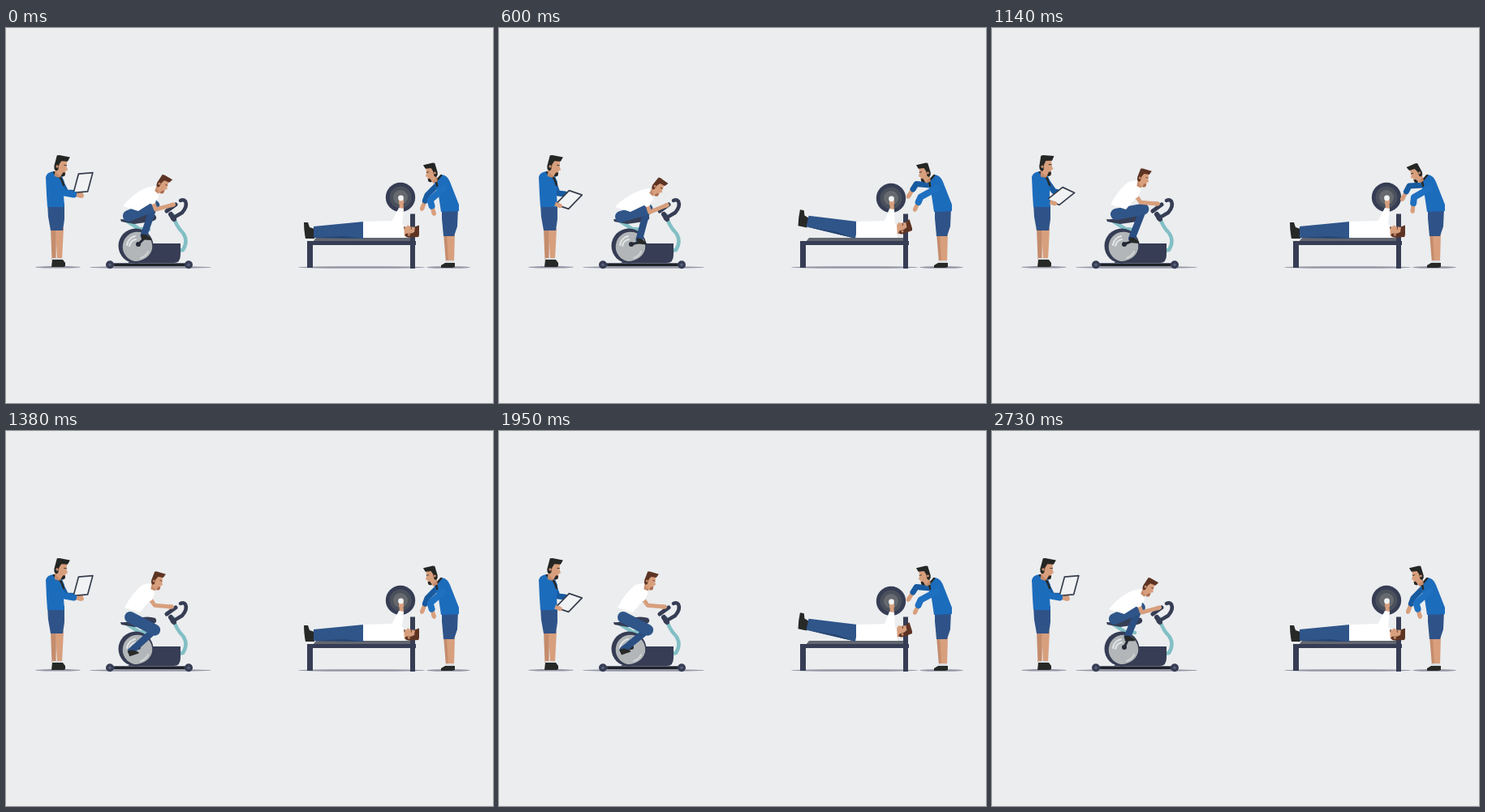
Animation, 600 px wide and 463 px high, one loop 2.76 s. Source, as an HTML page:

```html
<!DOCTYPE html>
<html lang="en">
<head>
<meta charset="utf-8">
<title>Gym training</title>
<style>
html, body { margin: 0; width: 100%; height: 100%; overflow: hidden; background: #ebedef; }
svg { display: block; width: 100%; height: 100%; }
.line { fill: none; stroke-linecap: round; stroke-linejoin: round; }
.navy { fill: #363d54; }
.skin { fill: #d89f7d; }
.shade { fill: #c48c6c; }
.black { fill: #272927; }
.jacket { fill: #1c6cbc; }
.shorts { fill: #2f5388; }
.floor { fill: #9495a5; }
.sock { fill: #d9dcdf; }
.white { fill: #fff; }
</style>
</head>
<body>
<svg viewBox="0 0 600 463" preserveAspectRatio="none">
  <g class="floor">
    <ellipse cx="64" cy="295.3" rx="28" ry="1.3"/>
    <ellipse cx="178" cy="295.5" rx="75" ry="1.3"/>
    <ellipse cx="438" cy="295.5" rx="78" ry="1.3"/>
    <ellipse cx="545" cy="295.5" rx="27" ry="1.3"/>
  </g>

  <g id="coach">
    <path class="shade" d="M55 247h7l-.5 39h-5z"/>
    <path class="skin" d="M61 247h10l-2 39h-6z"/>
    <path class="sock" d="M57 284h12v3H57z"/>
    <path class="black" d="M57 286h13l3 4v4l-2 1H56z"/>
    <path class="shorts" d="M51 216h21v20l-2 14H55l-3-17z"/>
    <g id="coachFar"></g>
    <path class="jacket" d="M49 184q1-6 10-7l9 4 4 9-1 16 1 15H51l-1-15z"/>
    <path class="line" stroke="#272927" stroke-width="2.5" d="M59 178L68 186L71 194"/>
    <g id="coachHead"></g>
    <path id="tablet" fill="#f1f2f4" stroke="#363d4c" stroke-width="1.7" stroke-linejoin="round"/>
    <g id="coachNear"></g>
  </g>

  <g id="bike">
    <path class="line" stroke="#82bfc5" stroke-width="4.5" d="M206 231Q209 244 218 253Q225 263 218 274L213 275M150 239L164 248L176 249"/>
    <circle class="navy" cx="160" cy="269" r="21.5"/>
    <circle cx="162" cy="270" r="18.3" fill="#b2b6b8"/>
    <path class="line" stroke="#e3e6e7" stroke-width="2" d="M149 268a13 13 0 0 1 10-11M152 269a10 10 0 0 1 8-8"/>
    <path class="line" stroke="#d0d3d4" stroke-width="2" d="M175 276a14 14 0 0 1-9 8"/>
    <path class="navy" d="M150 289C172 289 181 280 181 266H215V280Q215 290 207 290H152z"/>
    <path class="line" stroke="#363d54" stroke-width="4" d="M128 292.3H225"/>
    <path class="line" stroke="#1f2228" stroke-width="3" d="M135 292.5H219"/>
    <g class="navy"><circle cx="128" cy="292.3" r="5"/><circle cx="225" cy="292.3" r="5"/></g>
    <g fill="#596179"><circle cx="128" cy="292.3" r="1.8"/><circle cx="225" cy="292.3" r="1.8"/></g>
    <path class="navy" d="M141 236Q153 237 162 231Q175 228 184 231Q188 237 179 239L158 242L142 239z"/>
    <path class="line" stroke="#363d54" stroke-width="4.5" d="M205 235L217 228Q224 220 221 214Q219 211 215 213"/>
    <path class="line" stroke="#363d54" stroke-width="6" d="M203 230L207 236"/>
    <path class="line" stroke="#363d54" stroke-width="5" d="M198 226L209 218"/>
    <path id="crank" class="line" stroke="#252a36" stroke-width="3"/>
    <circle cx="163" cy="267" r="3" fill="#252a36"/>
  </g>

  <g id="rider">
    <path id="shank" class="line" stroke="#2b4f83" stroke-width="8.5"/>
    <path id="thigh" class="line" stroke="#2f5589" stroke-width="14"/>
    <path id="shoe" class="black" d="M-4-5L2-4L8 1V3L-4 2z"/>
    <path id="shirt" class="white"/>
    <g id="riderHead"></g>
    <g id="riderArm"></g>
  </g>

  <g id="bench">
    <path fill="#62666f" d="M382 259H498V264H378z"/>
    <path class="navy" d="M371 263H505V268H378V296H371zM498 229.5H504V297H498z"/>
  </g>
  <g id="lifter">
    <g id="legs">
      <path class="black" d="M367 240h5l2 6 6 2v12h-11q-2-10-2-20z"/>
      <path fill="#2f5589" d="M379 245L441 239V260L379 259z"/>
      <path fill="#27446f" d="M379 259L416 257L441 260z"/>
    </g>
    <g id="lifterHead"></g>
    <path class="white" d="M440 239L476 238L490 243L491 259H440z"/>
    <g id="bar">
      <circle class="navy" cx="486" cy="209" r="18.2"/>
      <circle cx="486" cy="209" r="13.5" fill="#4b515c"/>
      <circle cx="486" cy="209" r="9" fill="#666a6f"/>
      <path class="line" stroke="#d89f7d" stroke-width="5" d="M487 217L487.500 225"/>
      <path class="skin" d="M484 212h6v5h-6z"/>
      <circle cx="486.500" cy="210" r="3.400" fill="#f2f3f4"/>
    </g>
    <path id="sleeve" class="white"/>
  </g>

  <g id="spotter">
    <path class="shade" d="M539 253h8l-1 37h-4z"/>
    <path class="skin" d="M543 253h10l-1 37h-7z"/>
    <path class="sock" d="M542 287h10v4h-10z"/>
    <path class="black" d="M541 290h12v5l-3 1h-14v-3z"/>
    <path class="shorts" d="M537 222h20l-1 23-4 12h-13l-2-22z"/>
    <g id="spotFar"></g>
    <path class="jacket" d="M527 189L537 181Q544 182 547 190L558 218V226L536 227L533 207z"/>
    <path class="line" stroke="#272927" stroke-width="2.5" d="M536 182L530 189L531 195"/>
    <g id="spotHead"></g>
    <g id="spotNear"></g>
  </g>
</svg>
<script>
const LOOP = 2760, HALF = LOOP / 2, STEP = 30, TURNS = 5;
const HUB = [163, 267];
const $ = id => document.getElementById(id);
const set = (id, name, value) => $(id).setAttribute(name, value);
const lerp = (a, b, k) => Array.isArray(a) ? a.map((v, i) => lerp(v, b[i], k)) : a + (b - a) * k;
const path = (...points) => 'M' + points.map(p => p.join(' ')).join('L');
const polar = (r, angle) => [r * Math.cos(angle), r * Math.sin(angle)];
const add = ([x, y], [dx, dy], k = 1) => [x + dx * k, y + dy * k];
const rad = degrees => degrees * Math.PI / 180;

function progress(t, from, to) {
  return Math.min(1, Math.max(0, (t - from) / (to - from)));
}
function ramp(t, from, to) {
  const k = progress(t, from, to);
  return k * k * (3 - 2 * k);
}

// Both trainers move from a rest pose to a second and third one, then back.
function blend(t, rest, second, third) {
  const there = lerp(lerp(rest, second, ramp(t, 0, 560)), third, ramp(t, 610, 900));
  return lerp(there, rest, ramp(t, 990, 1350));
}

// Middle joint of a two-part limb; side picks the way it bends.
function bend([ax, ay], [bx, by], upper, lower, side) {
  const dx = bx - ax, dy = by - ay, d = Math.hypot(dx, dy);
  const along = (upper ** 2 - lower ** 2 + d * d) / (2 * d);
  const out = side * Math.sqrt(Math.max(0, upper ** 2 - along ** 2));
  return [ax + (dx * along + dy * out) / d, ay + (dy * along - dx * out) / d];
}

function makeHead(id, hair, beard) {
  $(id).innerHTML = `
    <path class="shade" d="M-6-6L3-3L2 4L-5 3z"/>
    <path class="skin" d="M-6-20H7L8-12L10.500-8L8-7V-1L3 2L-4-2z"/>
    <path fill="${hair}" d="M-8-10L-7-24L-4-25H10L8-19L0-18L-2-13V-6L-4-4L-7-6z"/>
    <path fill="${hair}" d="M4-14H8V-13H4z"/>
    <path fill="${beard}" d="M5-4H8V0L5 2L3 1z"/>
    <circle cx="-4" cy="-10" r="1.800" class="shade"/>`;
}
function placeHead(id, [x, y], turn, sx, sy = sx) {
  set(id, 'transform', `translate(${x} ${y}) rotate(${turn}) scale(${sx} ${sy})`);
}

function makeArm(id, color, width) {
  $(id).innerHTML = `<path class="line" stroke="#d89f7d" stroke-width="5"/>
    <ellipse class="skin" rx="4" ry="2.700"/>
    <path class="line" stroke="${color}" stroke-width="${width}"/>`;
}
function placeArm(id, shoulder, hand, upper, lower, side, cuff) {
  const [bare, palm, sleeve] = $(id).children;
  const elbow = bend(shoulder, hand, upper, lower, side);
  const turn = Math.atan2(hand[1] - elbow[1], hand[0] - elbow[0]) / rad(1);
  const end = cuff ? [elbow, lerp(elbow, hand, cuff)] : [lerp(shoulder, elbow, .3)];
  bare.setAttribute('d', path(shoulder, elbow, hand));
  palm.setAttribute('transform', `translate(${hand}) rotate(${turn})`);
  sleeve.setAttribute('d', path(shoulder, ...end));
}

function drawCoach(t) {
  const tilt = blend(t, 0, .5, 1);
  const center = blend(t, [95, 191], [86, 212], [79, 217.500]);
  const long = polar(12, rad(-75 + 58 * tilt));
  const short = polar(8.800 - 3 * tilt ** 3, rad(-5 + 48 * tilt));
  const corner = (a, b) => add(add(center, long, a), short, b);
  set('tablet', 'd', path(corner(-1, -1), corner(1, -1), corner(1, 1), corner(-1, 1)) + 'z');
  placeArm('coachNear', [55, 190], blend(t, [92, 207], [74, 219], [67, 222]), 22, 20, -1, .55);
  placeArm('coachFar', [66, 187], blend(t, [91, 204], [89, 206], [94, 207]), 18, 17, -1, .55);
  placeHead('coachHead', [65, 181], blend(t, 11, 11, 1), .95);
}

function drawRider(t) {
  const lean = .7 + .3 * ramp(t, 0, 600) - ramp(t, 600, 900) + .7 * ramp(t, 1980, 2280);
  const angle = -Math.PI / 4 + t / LOOP * TURNS * 2 * Math.PI;
  const pedal = add(HUB, polar(11, angle));
  const ankle = add(pedal, [-1, -3]);
  const hip = lerp([153, 230], [150, 233], lean);
  const neck = lerp([183, 194], [190, 204], lean);
  const knee = bend(hip, ankle, 34, 39, 1);
  const fromHip = (x, y) => add(hip, [x, y]), fromNeck = (x, y) => add(neck, [x, y]);
  set('crank', 'd', path(HUB, pedal));
  set('thigh', 'd', path(hip, knee));
  set('shank', 'd', path(knee, ankle));
  set('shoe', 'transform', `translate(${pedal}) rotate(${-12 + 14 * Math.cos(angle)})`);
  set('shirt', 'd', `M${fromHip(-7, -12)}Q${[hip[0] + 3, neck[1] + 5]} ${fromNeck(-15, -4)}
    L${fromNeck(-5, -6)}Q${fromNeck(3, 2)} ${fromNeck(-1, 10)}L${fromHip(12, -6)}z`);
  placeHead('riderHead', neck, 17 + 18 * lean, .82);
  placeArm('riderArm', fromNeck(-9, 8), lerp([203, 217], [206, 219], lean), 16, 20 + 2 * lean, -1, 0);
}

function drawLifter(t) {
  const lift = 12.500 * ramp(t, 0, 580) * (1 - progress(t, 600, 975) ** 3);
  const [dx, dy] = blend(t, [0, 0], [-3, 1], [0, 0]);
  set('legs', 'transform', `rotate(${lift} 441 250)`);
  set('bar', 'transform', `translate(${dx} ${dy})`);
  set('sleeve', 'd', path([474, 241], [484 + dx, 222 + dy], [490 + dx, 223 + dy], [488, 243]) + 'z');
  placeHead('lifterHead', [488, 252 - lift / 8], 90 - lift * 1.400, -.84, .84);
}

function drawSpotter(t) {
  placeArm('spotFar', [531, 194], blend(t, [513, 222], [505, 207], [502, 203]), 17, 17, -1, .45);
  placeArm('spotNear', [539, 198], blend(t, [527, 228], [513, 223], [513, 223]), 22, 16, -1, .45);
  placeHead('spotHead', [527, 188], blend(t, -13, -13, -31), -.85, .85);
}

makeHead('coachHead', '#242624', '#242624');
makeHead('spotHead', '#242624', '#242624');
makeHead('riderHead', '#5d3424', '#a96d50');
makeHead('lifterHead', '#5d3424', '#6b3f2b');
makeArm('coachNear', '#1c6cbc', 8);
makeArm('coachFar', '#185a9f', 7);
makeArm('spotFar', '#185a9f', 7);
makeArm('spotNear', '#1e70c0', 8);
makeArm('riderArm', '#fff', 8);

const start = performance.now();
function frame() {
  const t = Math.floor((performance.now() - start) % LOOP / STEP) * STEP;
  drawCoach(t % HALF);
  drawRider(t);
  drawLifter(t % HALF);
  drawSpotter(t % HALF);
  requestAnimationFrame(frame);
}
frame();
</script>
</body>
</html>
```
